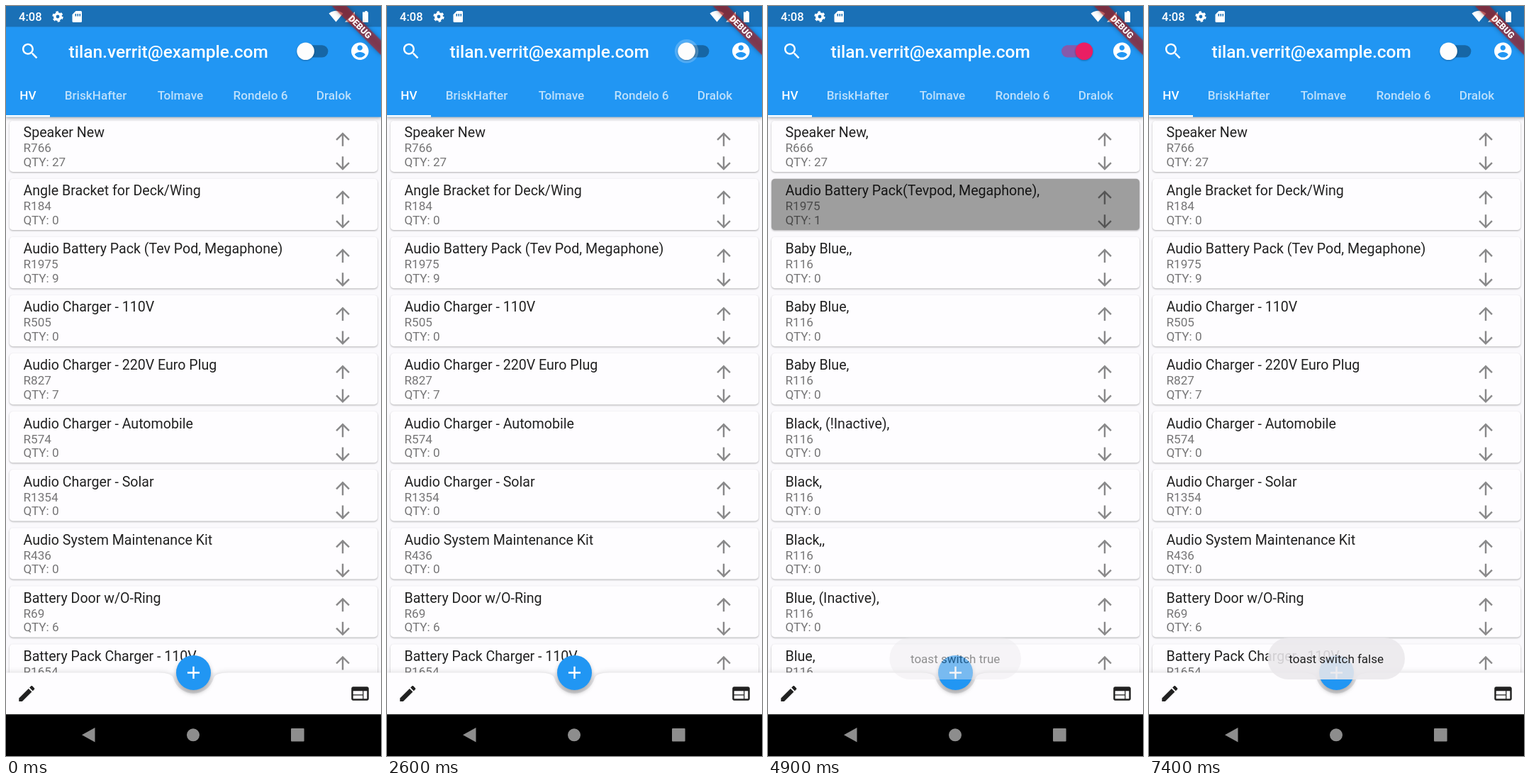
An HTML page for the animation above (7.5 s loop, 529x1058 px).

```html
<!DOCTYPE html>
<html lang="en">
<head>
<meta charset="utf-8">
<title>Stock list</title>
<style>
  html, body { margin: 0; height: 100%; overflow: hidden; }
  svg { display: block; width: 100vw; height: 100vh; font-family: Roboto, sans-serif; }
  .medium { font-weight: 500; }
  .card { filter: drop-shadow(0 1.3px 1px rgba(0,0,0,.3)); }
  .name { font-size: 19.6px; fill: rgba(0,0,0,.87); }
  .info { font-size: 17.15px; fill: rgba(0,0,0,.54); }
  .toast { font-size: 17px; text-anchor: middle; }
</style>
</head>
<body>
<svg viewBox="0 0 529 1058">
  <defs>
    <clipPath id="body"><rect y="156" width="529" height="784.4"/></clipPath>
    <path id="up" d="M4 12l1.41 1.41L11 7.83V20h2V7.83l5.58 5.59L20 12l-8-8-8 8z"/>
    <path id="down" d="M20 12l-1.41-1.41L13 16.17V4h-2v12.17l-5.58-5.59L4 12l8 8 8-8z"/>
    <path id="edit" d="M3 17.25V21h3.75L17.81 9.94l-3.75-3.75L3 17.25zM20.71 7.04c.39-.39.39-1.02 0-1.41l-2.34-2.34c-.39-.39-1.02-.39-1.41 0l-1.83 1.83 3.75 3.75 1.83-1.83z"/>
    <path id="web" d="M20 4H4c-1.1 0-2 .9-2 2v12c0 1.1.9 2 2 2h16c1.1 0 2-.9 2-2V6c0-1.1-.9-2-2-2zm-5 14H4v-4h11v4zm0-5H4V9h11v4zm5 5h-4V9h4v9z"/>
    <path id="search" d="M15.5 14h-.79l-.28-.27C15.41 12.59 16 11.11 16 9.5 16 5.91 13.09 3 9.5 3S3 5.91 3 9.5 5.91 16 9.5 16c1.61 0 3.09-.59 4.23-1.57l.27.28v.79l5 4.99L20.49 19l-4.99-5zm-6 0C7.01 14 5 11.99 5 9.5S7.01 5 9.5 5 14 7.01 14 9.5 11.99 14 9.5 14z"/>
    <path id="account" d="M12 2C6.48 2 2 6.48 2 12s4.48 10 10 10 10-4.48 10-10S17.52 2 12 2zm0 3c1.66 0 3 1.34 3 3s-1.34 3-3 3-3-1.34-3-3 1.34-3 3-3zm0 14.2c-2.5 0-4.71-1.28-6-3.22.03-1.99 4-3.08 6-3.08 1.99 0 5.97 1.09 6 3.08-1.29 1.94-3.5 3.22-6 3.22z"/>
    <path id="plus" d="M19 13h-6v6h-2v-6H5v-2h6V5h2v6h6v2z"/>
  </defs>

  <rect width="529" height="1058" fill="#faf9fc"/>
  <g clip-path="url(#body)"><g id="offList"></g><g id="onList"></g></g>

  <!-- App bar -->
  <rect width="529" height="156.6" fill="#2196f3" style="filter:drop-shadow(0 2px 2px rgba(0,0,0,.28))"/>
  <rect width="529" height="29.4" fill="#1a70b6"/>
  <g fill="#fff">
    <text class="medium" x="18" y="21" font-size="16.5">4:08</text>
    <circle cx="73" cy="15" r="4.2" fill="none" stroke="#fff" stroke-width="3.6"/>
    <circle cx="73" cy="15" r="6.4" fill="none" stroke="#fff" stroke-width="2.6" stroke-dasharray="3.4 3.3"/>
    <path fill-rule="evenodd" d="M98.500 7h7q1.500 0 1.500 1.500v13q0 1.500-1.500 1.500h-10.500q-1.500 0-1.500-1.500v-9.500zM97.500 11v3.500h1.600v-3.500zm3 0v3.500h1.600v-3.500zm3 0v3.500h1.600v-3.500z"/>
    <path d="M455.500 10.500q10-7.500 20 0L465.500 22.500zM478 22.500L492 8v14.500zM505 8.500h1.500V7h3v1.500h1.500V23h-8V8.500z"/>
    <text class="medium" x="88.500" y="72.500" font-size="24.5">tilan.verrit@example.com</text>
    <rect y="154" width="62" height="2.6"/>
  </g>
  <g id="tabs" class="medium" font-size="17.15" fill="#fff"></g>

  <!-- Switch -->
  <rect id="track" x="414" y="55.200" width="40.400" height="17.200" rx="8.600"/>
  <circle id="halo" cy="63.800"/>
  <circle id="thumb" cy="63.800" r="12.300" style="filter:drop-shadow(0 1px 1px rgba(0,0,0,.3))"/>

  <!-- Bottom bar with a round notch -->
  <path fill="#fefdff" style="filter:drop-shadow(0 0 4px rgba(0,0,0,.16))"
    d="M0 940.400H215.500Q233.900 940.400 236.300 948.600A29.400 29.400 0 0 0 292.700 948.600Q295.100 940.400 313.500 940.400H529V1000H0z"/>
  <circle cx="264.500" cy="940.400" r="24.500" fill="#2196f3" style="filter:drop-shadow(0 4px 3px rgba(0,0,0,.32))"/>
  <rect y="999.200" width="529" height="59" fill="#000"/>
  <g fill="#8d8d8d">
    <path d="M107 1028.300L125.500 1018V1038.500z"/>
    <circle cx="264" cy="1028.300" r="9"/>
    <rect x="402" y="1019" width="18.600" height="18.600" rx="1"/>
  </g>
  <g id="icons"></g>

  <g id="toastTrue"></g>
  <g id="toastFalse"></g>

  <g transform="translate(499.600 29.400) rotate(45)">
    <rect x="-49" y="-7.350" width="98" height="14.700" fill="#b71c1c" fill-opacity=".63" style="filter:drop-shadow(0 0 3px rgba(0,0,0,.5))"/>
    <text y="4.400" font-size="12.5" font-weight="900" fill="#fff" text-anchor="middle">DEBUG</text>
  </g>
</svg>

<script>
const LOOP = 7500;
const $ = id => document.getElementById(id);

const icon = (name, x, y, fill) =>
  `<use href="#${name}" fill="${fill}" transform="translate(${x} ${y}) scale(1.225) translate(-12 -12)"/>`;

const card = ([name, price, qty, shade = '#fefdff'], i) => {
  const grey = 'rgba(0,0,0,.46)';
  return `<g transform="translate(0 ${i * 82.07})">
    <rect class="card" x="4.900" y="161.700" width="519.200" height="72.300" rx="4.900" fill="${shade}"/>
    <text class="name" x="24.500" y="185.200">${name}</text>
    <text class="info" x="24.500" y="206.200">R${price}</text>
    <text class="info" x="24.500" y="225.700">QTY: ${qty}</text>
    ${icon('up', 475, 188, grey)}${icon('down', 475, 222, grey)}</g>`;
};

const toast = (text, width) =>
  `<rect x="${264.2 - width / 2}" y="891" width="${width}" height="59" rx="29" fill="#ebe9ec" fill-opacity=".88"/>
   <text class="toast" x="264.200" y="927" fill="#202020">${text}</text>`;

$('offList').innerHTML = [
  ['Speaker New', 766, 27],
  ['Angle Bracket for Deck/Wing', 184, 0],
  ['Audio Battery Pack (Tev Pod, Megaphone)', 1975, 9],
  ['Audio Charger - 110V', 505, 0],
  ['Audio Charger - 220V Euro Plug', 827, 7],
  ['Audio Charger - Automobile', 574, 0],
  ['Audio Charger - Solar', 1354, 0],
  ['Audio System Maintenance Kit', 436, 0],
  ['Battery Door w/O-Ring', 69, 6],
  ['Battery Pack Charger - 110V', 1654, 0],
].map(card).join('');

$('onList').innerHTML = [
  ['Speaker New,', 666, 27],
  ['Audio Battery Pack(Tevpod, Megaphone),', 1975, 1, '#9e9e9e'],
  ...['Baby Blue,,', 'Baby Blue,', 'Baby Blue,', 'Black, (!Inactive),', 'Black,', 'Black,,', 'Blue, (Inactive),', 'Blue,']
    .map(name => [name, 116, 0]),
].map(card).join('');

$('tabs').innerHTML = [['HV', 31], ['BriskHafter', 126.5], ['Tolmave', 246], ['Rondelo 6', 359], ['Dralok', 462.5]]
  .map(([name, x], i) => `<text x="${x}" y="132.300" text-anchor="middle" fill-opacity="${i ? .7 : 1}">${name}</text>`).join('');

$('icons').innerHTML = icon('search', 34, 63.8, '#fff') + icon('account', 499.3, 63.8, '#fff') +
  icon('plus', 264.5, 940.4, '#fff') + icon('edit', 29.3, 970, '#212121') + icon('web', 499.5, 970, '#212121');

$('toastTrue').innerHTML = toast('toast switch true', 185.5);
$('toastFalse').innerHTML = toast('toast switch false', 193.5);

const ramp = (t, from, to) => Math.min(1, Math.max(0, (t - from) / (to - from)));
const ease = p => p * p * (3 - 2 * p);
const mix = (a, b, p) => `rgb(${a.map((v, i) => Math.round(v + (b[i] - v) * p))})`;

function draw(t) {
  const on = t >= 3050 && t < 6000;
  $('onList').style.display = on ? '' : 'none';
  $('offList').style.display = on ? 'none' : '';

  const p = ease(ramp(t, 3050, 3230) - ramp(t, 6000, 6180));
  const x = 422.6 + 23.4 * p;
  const tint = mix([253, 253, 253], [233, 30, 99], p);
  $('track').setAttribute('fill', mix([22, 102, 165], [133, 90, 171], p));
  $('thumb').setAttribute('cx', x);
  $('thumb').setAttribute('fill', tint);

  const press = t < 5000 ? 2500 : 5350;
  $('halo').setAttribute('cx', x);
  $('halo').setAttribute('r', 24.5 * ramp(t, press - 70, press + 180));
  $('halo').setAttribute('fill', tint);
  $('halo').setAttribute('opacity', .22 * (1 - ramp(t, press + 250, press + 400)));

  $('toastTrue').setAttribute('opacity', ramp(t, 2750, 2920) - ramp(t, 4800, 5000));
  $('toastFalse').setAttribute('opacity', ramp(t, 5620, 5800));
}

function tick() {
  draw(performance.now() % LOOP);
  requestAnimationFrame(tick);
}
tick();
</script>
</body>
</html>
```
